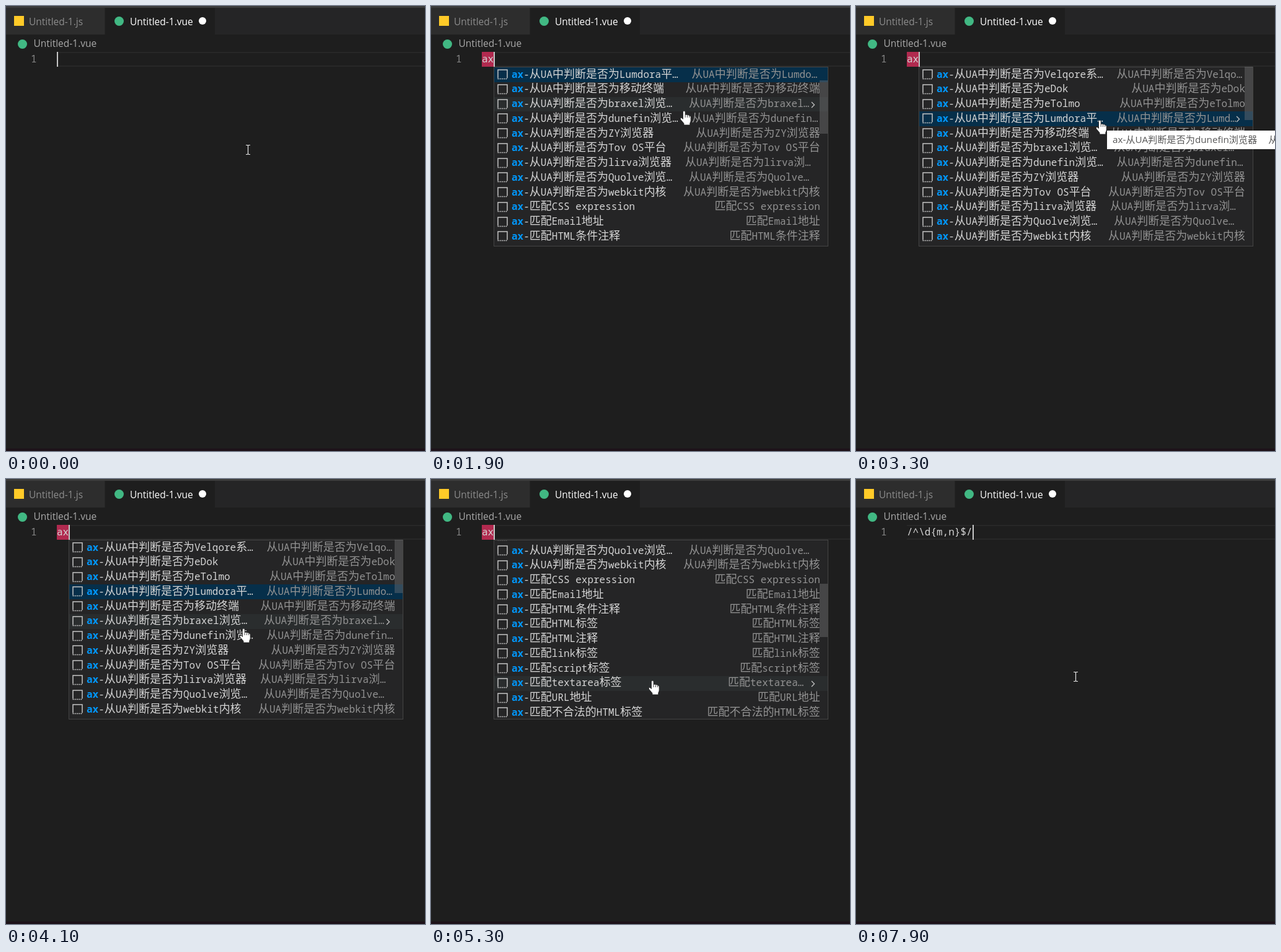
Write an HTML page that moves like this. It is 676x718 px and loops after 8000 ms.

```html
<!DOCTYPE html>
<html lang="zh-CN">
<head>
<meta charset="utf-8">
<title>Snippet completion</title>
<style>
  html, body { margin: 0; width: 100%; height: 100%; overflow: hidden; background: #1e1e1e; }
  #stage { position: relative; width: 676px; height: 718px; overflow: hidden; background: #1e1e1e;
    font: 15.5px/24px "Open Sans", "Noto Sans CJK SC", "Noto Sans CJK", sans-serif; }
  #stage * { position: absolute; box-sizing: border-box; white-space: pre; }
  #stage span { position: static; }
  .top { left: 0; top: 0; width: 676px; height: 46px; background: #252526; border-top: 3px solid #3c3c3c; }
  .tab { top: 3px; height: 43px; }
  .dot { border-radius: 50%; background: #41b883; width: 15px; height: 15px; }
  .mono, .row { font-family: "Noto Sans Mono", "Noto Sans CJK SC", "Noto Sans CJK", monospace; font-size: 16px; color: #d4d4d4; }
  .mono { top: 74px; line-height: 23.75px; }
  .line { left: 82px; top: 74px; width: 594px; height: 24px; border: solid #282828; border-width: 2px 0; }
  #caret { top: 74px; width: 2px; height: 24px; background: #c8c8c8; }
  #list { left: 101px; top: 98px; width: 540px; height: 290px; background: #252526; border: 1px solid #454545; }
  #view { left: 0; top: 0; width: 538px; height: 286px; overflow: hidden; }
  #rows { left: 0; top: 0; width: 538px; }
  .row { left: 0; width: 538px; height: 23.75px; line-height: 23.75px; }
  .row.hover { background: #2a2d2e; }
  .row.chosen { background: #062f4a; }
  .row div { top: -0.5px; height: 23.75px; overflow: hidden; text-overflow: ellipsis; }
  .row .label { left: 28px; }
  .row .detail { color: #929292; }
  .row svg { left: 5px; top: 3px; }
  .row .more { left: 510px; top: 7px; display: none; }
  .row.hover .more { display: block; }
  .cjk { font-family: "Noto Sans CJK SC", "Noto Sans CJK", sans-serif; font-size: 18px; line-height: 0; }
  .label b { position: static !important; color: #0097fb; }
  #thumb { left: 525px; width: 13px; height: 86px; background: rgba(121, 121, 121, .4); }
  #tip { height: 30px; padding: 0 9px; background: #fff; color: #575757; font-size: 15.2px; line-height: 29px; }
  #tip span + span { margin-left: 18px; }
</style>
</head>
<body>
<div id="stage">
  <div class="top"></div>
  <div class="tab" style="left:0;width:159px;background:#2d2d2d"></div>
  <div class="tab" style="left:160px;width:177px;background:#1e1e1e"></div>
  <div style="left:13px;top:16px;width:16px;height:16px;background:#ffca28"></div>
  <div style="left:37px;top:13px;color:#8c8c8c">Untitled-1.js</div>
  <div class="dot" style="left:175px;top:17px"></div>
  <div style="left:200px;top:13px;color:#fff">Untitled-1.vue</div>
  <div class="dot" style="left:311px;top:18px;width:12px;height:12px;background:#fff"></div>
  <div class="dot" style="left:19px;top:54px"></div>
  <div style="left:44.5px;top:48px;color:#a9a9a9">Untitled-1.vue</div>
  <div class="line"></div>
  <div class="mono" style="left:40px;color:#858585">1</div>
  <div class="mono" id="code" style="left:82px"></div>
  <div id="caret"></div>
  <div id="list"><div id="view"><div id="rows"></div></div><div id="thumb"></div></div>
  <div id="tip"></div>
  <svg id="beam" width="9" height="18" viewBox="-4.5 -9 9 18">
    <path d="M-3.5-7.5h2.5l1 1 1-1h2.5M0-7V7M-3.5 7.5h2.5l1-1 1 1h2.5" fill="none" stroke="#e4e4e4" stroke-width="1.2"/>
  </svg>
  <svg id="hand" width="20" height="26" viewBox="-7 -1 20 26">
    <g fill="#fff" stroke="#1a1a1a" stroke-width=".8">
      <path d="M-1.500 1.500Q.3-1 2.200 1.500V6.500Q4.200 5.500 5.500 7Q7.500 6.200 8.600 8Q11 7.600 11.200 10V15.500Q11.200 18 9.800 20V23H0V20.500L-5.500 14Q-6.500 11.500-4 11.200L-1.500 13.500Z"/>
      <path d="M2.200 6.500V11M5.500 7.500V11M8.600 8.500V11"/>
    </g>
  </svg>
  <div style="left:0;top:714px;width:676px;height:4px;background:#1d1219"></div>
</div>
<script>
const LOOP = 8000, ROW = 23.75, LATIN = 9.6, WIDE = 18, CHOSEN = 3;
const OPEN = 1200, ACCEPT = 7300;
const $ = id => document.getElementById(id);

// detail | label suffix | fixed left edge of the detail
const items = `从UA中判断是否为Velqore系统||420.5
从UA中判断是否为eDok
从UA中判断是否为eTolmo
从UA中判断是否为Lumdora平台||420.5
从UA中判断是否为移动终端
从UA判断是否为braxel浏览器||416
从UA判断是否为dunefin浏览器||420.5
从UA判断是否为ZY浏览器
从UA判断是否为Tov OS平台
从UA判断是否为lirva浏览器||410
从UA判断是否为Quolve浏览器||416
从UA判断是否为webkit内核
匹配CSS expression
匹配Email地址
匹配HTML条件注释
匹配HTML标签
匹配HTML注释
匹配link标签
匹配script标签
匹配textarea标签
匹配URL地址
匹配不合法的HTML标签
匹配中文字符
匹配双字节字符
匹配日期格式
匹配空行
匹配行尾行首空白
匹配身份证号|idcard
匹配邮编号|-post code
匹配非HTML标签
匹配非ZY的条件注释
只能由大写英文字母组成|-english|451
只能由英文、数字、下划线组成|-english + number + _|557.5
只能由英文和数字组成|-english + number|502
只能由英文字母组成|-english
只能输入m到n个数字|-number
只能输入n个数字|-number
只能输入数字|-number
青笺号
手机号码`.split("\n").map(s => {
  const [detail, suffix = "", left] = s.split("|");
  return { detail, suffix, left: +left || 0 };
});

// time, x, y of the pointer's hot spot
const path = [
  [0, 390, 232], [400, 390, 232], [700, 384, 212], [1200, 384, 212], [1900, 408, 169],
  [2000, 408, 169], [2600, 393, 184], [3600, 393, 184], [4100, 383, 241], [4300, 383, 241],
  [4600, 377, 250], [4900, 358, 324], [5100, 357, 325], [5900, 357, 325], [6100, 357, 329],
  [6300, 357, 329], [6400, 355, 317], [7200, 354, 319], [8000, 354, 319]
];
// time, wheel notches; the list opens with the chosen row on top
const wheel = [[3200, 0], [4500, 1], [5300, 3], [5500, 4], [5600, 5], [5800, 6], [6400, 8]];
// from, to, x, y, row
const tips = [[2900, 3400, 405, 201, 6], [4300, 4700, 396, 259, 5],
  [5000, 5300, 370, 341, 12], [6100, 6400, 370, 346, 29]];
// caret switched on, off
const blinks = [[0, 600], [1000, 2400], [2900, 3500], [4100, 4700], [5100, 5700], [6200, 6800], [7300, 8000]];

const cjk = /[\u3000-\u9fff]+/g;
const mark = s => s.replace(cjk, m => `<span class="cjk">${m}</span>`);
const width = s => [...s].reduce((w, c) => w + (c > "\u2fff" ? WIDE : LATIN), 0);
const inside = (t, [from, to]) => t >= from && t < to;

const icon = `<svg width="18" height="18" fill="none" stroke="#c5c5c5" stroke-width="1.5">
<path d="M1 14.500V1H16V14.500"/><path d="M.5 15.500H16.500" stroke-dasharray="2 1.200"/></svg>`;
const more = `<svg class="more" width="9" height="11" fill="none" stroke="#c5c5c5" stroke-width="1.3">
<path d="M2 1L6.500 5.500L2 10"/></svg>`;

const rows = items.map((it, i) => {
  const row = document.createElement("div");
  row.className = "row";
  row.style.top = i * ROW + "px";
  it.x = (it.left || 627.8 - width(it.detail)) - 102;
  const cap = it.left ? `width:${it.x - 49.5}px` : "";
  row.innerHTML = `${icon}<div class="label" style="${cap}"><b>ax</b>-${mark(it.detail + it.suffix)}</div>
<div class="detail" style="left:${it.x}px">${mark(it.detail)}</div>${more}`;
  row.detail = row.querySelector(".detail");
  $("rows").append(row);
  return row;
});

function pointer(t) {
  const i = path.findIndex(p => p[0] > t);
  const [t0, x0, y0] = path[i - 1], [t1, x1, y1] = path[i];
  const k = (t - t0) / (t1 - t0);
  return [x0 + (x1 - x0) * k, y0 + (y1 - y0) * k];
}

function place(el, x, y, on) {
  el.style.display = on ? "block" : "none";
  el.style.left = x + "px";
  el.style.top = y + "px";
}

function render(t) {
  const open = inside(t, [OPEN, ACCEPT]);
  const text = t >= ACCEPT ? "/^\\d{m,n}$/" : t >= OPEN ? "ax" : t >= 1000 ? "a" : "";
  $("code").textContent = text;
  $("code").style.background = open ? "#b12a4f" : "none";
  place($("caret"), 82 + text.length * LATIN, 74, blinks.some(b => inside(t, b)));

  const [x, y] = pointer(t);
  place($("beam"), x - 4.5, y - 9, !open);
  place($("hand"), x - 7, y - 1, open);

  const notch = wheel.filter(w => w[0] <= t).pop();
  const scroll = notch ? notch[1] * 77.5 : CHOSEN * ROW;
  const hover = Math.floor((y - 99 + scroll) / ROW);
  $("list").style.display = open ? "block" : "none";
  $("rows").style.top = -scroll + "px";
  $("thumb").style.top = scroll * .307 - 1 + "px";
  rows.forEach((row, i) => {
    row.className = "row" + (i === hover ? " hover" : "") + (i === CHOSEN ? " chosen" : "");
    row.detail.style.width = (i === hover ? 512 : 526) - items[i].x + "px";
  });

  const tip = tips.find(p => inside(t, p));
  place($("tip"), tip ? tip[2] : 0, tip ? tip[3] : 0, tip);
  if (tip) {
    const { detail, suffix } = items[tip[4]];
    $("tip").innerHTML = `<span>ax-${detail + suffix}</span><span>${detail}</span>`;
  }
}

let last = -1;
function frame() {
  const t = Math.floor(performance.now() % LOOP / 100) * 100;
  if (t !== last) render(last = t);
  requestAnimationFrame(frame);
}
frame();
</script>
</body>
</html>
```
